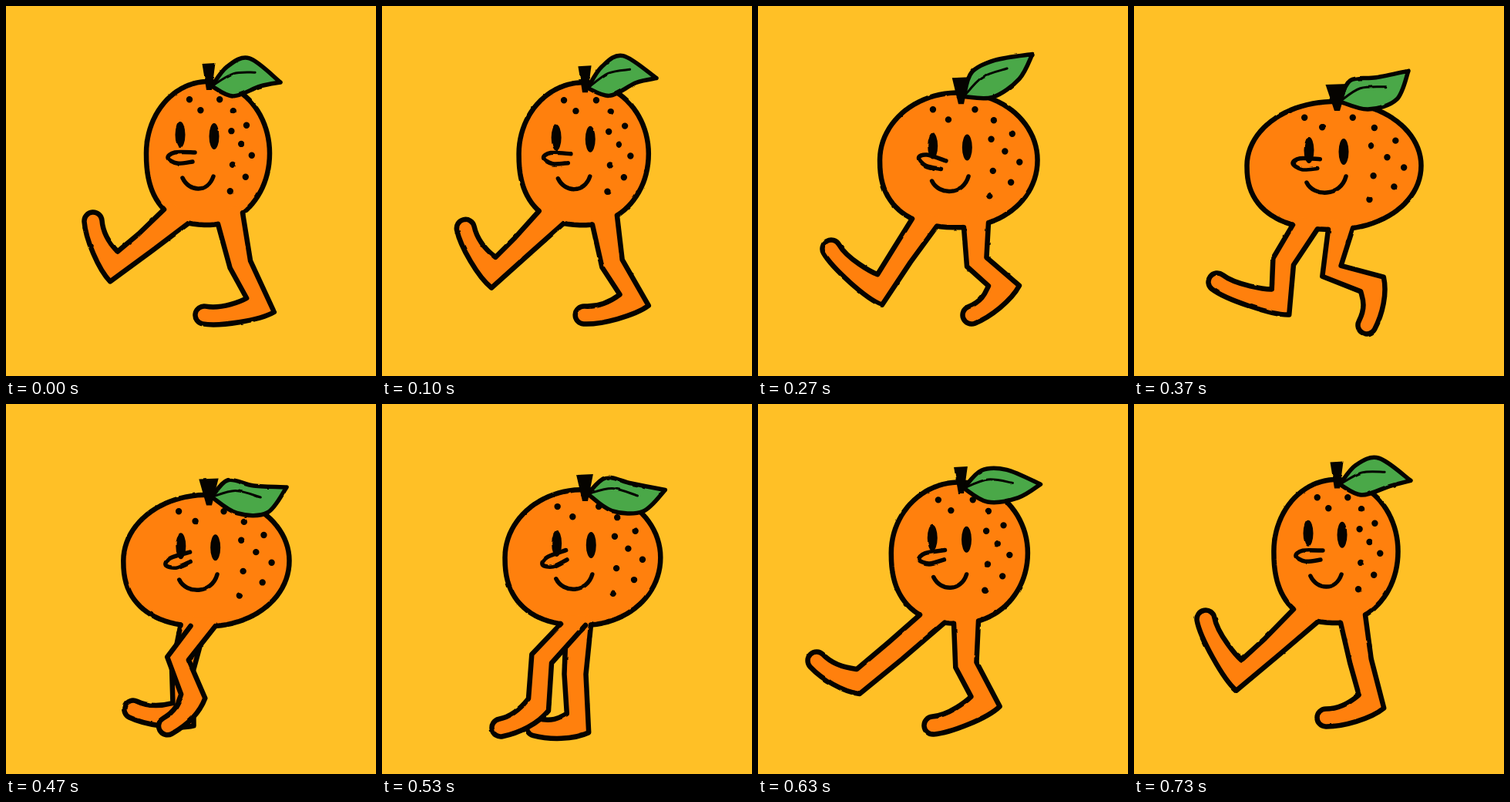
An HTML page that plays this animation: 480x480 px, repeating every 0.76 s.

```html
<!DOCTYPE html>
<html lang="en">
<head>
<meta charset="utf-8">
<title>Walking orange</title>
<style>
  html, body { margin: 0; width: 100%; height: 100%; overflow: hidden; background: #ffc026; }
  svg { display: block; width: 100vw; height: 100vh; }
  path { fill: none; stroke-linecap: round; stroke-linejoin: round; }
  .line { stroke: #050300; stroke-width: 6.5; }
  .skin { fill: #ff800d; }
  .thin { stroke-width: 5.5; }
  .ink { fill: #050300; }
  .leaf { fill: #4aa848; }
  .vein { stroke-width: 3; }
</style>
</head>
<body>
<svg viewBox="0 0 480 480">
  <filter id="rough" filterUnits="userSpaceOnUse" x="0" y="0" width="480" height="480" color-interpolation-filters="sRGB">
    <feTurbulence type="fractalNoise" baseFrequency=".06" numOctaves="2" seed="4"/>
    <feDisplacementMap in="SourceGraphic" scale="2" xChannelSelector="R" yChannelSelector="G"/>
  </filter>
  <g id="fruit" filter="url(#rough)"></g>
</svg>
<script>
const LOOP = 760; // one step; a leg repeats after two
const STEPS = [0, 70, 130, 170, 230, 270, 330, 370, 430, 470, 500, 530, 600, 630, 700, 730];

// Key poses of a leg: time, hip x, knee bend, ankle x y, toe x y
const STRIDE = [
  [0, 221, 0, 140, 338, 113, 279],
  [270, 216, 1, 158, 368, 95, 315],
  [370, 222, 13, 190, 384, 108, 358],
  [530, 255, 4, 254, 414, 199, 419],
  [630, 270, 13, 295, 386, 227, 417],
  [730, 284, 2, 308, 386, 249, 407],
  [760, 291, 7, 330, 388, 257, 401],
  [1030, 283, 19, 319, 363, 277, 401],
  [1130, 268, 37, 309, 361, 302, 414],
  [1290, 248, 20, 203, 390, 154, 420],
  [1390, 226, 0, 130, 360, 76, 333],
  [1490, 223, 0, 136, 352, 93, 279]
];
STRIDE.push([2 * LOOP, ...STRIDE[0].slice(1)]);

// Freckles, measured from the middle in body radii
const FRECKLES = [
  [-.3, -.75], [.19, -.75], [-.12, -.6], [.41, -.59], [.625, -.39], [.38, -.31],
  [.54, -.13], [.71, .03], [.4, .16], [.61, .33], [.36, .53]
];

const fruit = document.getElementById('fruit');
function path(cls) {
  const p = document.createElementNS('http://www.w3.org/2000/svg', 'path');
  p.setAttribute('class', cls);
  fruit.appendChild(p);
  return d => p.setAttribute('d', d);
}

const ui = {
  body: path('line skin'),
  legs: [0, 1].map(() => ({ fill: path('skin'), line: path('line') })),
  freckles: path('ink'), eyes: path('ink'),
  nose: path('line thin'), mouth: path('line thin'),
  leaf: path('line thin leaf'), vein: path('line vein'), stem: path('ink')
};

const { PI, sin, cos, abs, sign, sqrt, min, max } = Math;
const mix = (a, b, t) => a.map((v, i) => v + (b[i] - v) * t);
const move = (p, d, k) => [p[0] + d[0] * k, p[1] + d[1] * k];
const turn = ([x, y], a) => [x * cos(a) - y * sin(a), x * sin(a) + y * cos(a)];
const side = d => turn(d, PI / 2);
function unit(a, b) {
  const x = b[0] - a[0], y = b[1] - a[1], r = Math.hypot(x, y) || 1;
  return [x / r, y / r];
}
const between = (a, b) => unit([0, 0], move(a, b, 1));
const oval = (x, y, rx, ry) =>
  `M${x - rx} ${y}a${rx} ${ry} 0 1 1 ${2 * rx} 0a${rx} ${ry} 0 1 1 ${-2 * rx} 0Z`;

// Smooth curve through the points, continuing from the first one
function curve(pts) {
  const q = [pts[0], ...pts, pts[pts.length - 1]];
  return pts.slice(1).map((p, i) => {
    const c1 = move(q[i + 1], mix(q[i], q[i + 2], 1).map((v, k) => v - q[i][k]), 1 / 6);
    const c2 = move(p, p.map((v, k) => q[i + 3][k] - q[i + 1][k]), -1 / 6);
    return `C${c1} ${c2} ${p}`;
  }).join('');
}

// Squashes quickly, recovers softly
function squash(t) {
  if (t < 370) return (t / 370) ** 1.25;
  const u = (LOOP - t) / (LOOP - 370);
  return u * u * (3 - 2 * u);
}

// Rounded a little more at the lower left
const power = (x, y) => y < 0 ? 2 : x < 0 ? 2.4 : 2.04;

function makeBody(s) {
  const drop = s ** 1.5;
  return { cx: 262 - 2.5 * s, cy: 191 + 16 * drop, rx: 80 + 33 * s, ry: 93 - 10 * drop };
}

function drawBody({ cx, cy, rx, ry }) {
  const pts = Array.from({ length: 90 }, (_, i) => {
    const x = cos(i * PI / 45), y = sin(i * PI / 45), e = 2 / power(x, y);
    return [cx + rx * sign(x) * abs(x) ** e, cy + ry * sign(y) * abs(y) ** e];
  });
  ui.body(`M${pts.join('L')}Z`);
}

function onRim({ cx, cy, rx, ry }, x) {
  const u = (x - cx) / rx, n = power(u, 1);
  return [x, cy + ry * (1 - abs(u) ** n) ** (1 / n)];
}

function pose(t) {
  const i = STRIDE.findIndex((row, n) => n && t < row[0]);
  const a = STRIDE[i - 1], b = STRIDE[i];
  return mix(a, b, (t - a[0]) / (b[0] - a[0]));
}

function drawLeg(leg, t, body) {
  const [, hipX, bend, ax, ay, tx, ty] = pose(t);
  const hip = onRim(body, hipX), ankle = [ax, ay], toe = [tx, ty];
  const knee = move(mix(hip, ankle, .5), side(unit(hip, ankle)), bend);
  const hipF = onRim(body, hipX - 16), hipB = onRim(body, hipX + 16);

  const out = side(between(unit(hip, knee), unit(knee, ankle)));
  const kneeF = move(knee, out, 14), kneeB = move(knee, out, -14);

  const shin = unit(ankle, knee), foot = unit(ankle, toe);
  const bisect = between(shin, foot);
  const half = sqrt((1 - shin[0] * foot[0] - shin[1] * foot[1]) / 2);
  const wide = min(13.5 / half, 20);
  const ankleF = move(ankle, bisect, wide), heel = move(ankle, bisect, -wide);

  // The foot curls towards its tip
  const r = 11.5, pull = 22;
  const tip = turn(foot, .35), back = turn(foot, -.35);
  const top = move(toe, side(tip), r), low = move(toe, side(tip), -r);
  const outline = `L${kneeF}L${ankleF}` +
    `C${move(ankleF, back, pull / 3)} ${move(top, tip, -pull)} ${top}` +
    `A${r} ${r} 0 0 0 ${low}` +
    `C${move(low, tip, -pull)} ${move(heel, back, pull)} ${heel}` +
    `L${kneeB}L${hipB}`;

  const inside = p => move(p, unit(p, [body.cx, body.cy]), 12);
  leg.fill(`M${inside(hipF)}L${hipF}${outline}L${inside(hipB)}Z`);
  leg.line(`M${hipF}${outline}`);
}

function drawFace(s, wave, { cx, cy, rx, ry }) {
  ui.freckles(FRECKLES.map(([u, v]) =>
    oval(cx + u * (1 + .13 * s) * rx, cy + v * ry, 4.2, 4.2)).join(''));

  const eyeY = 168 + 20 * s ** .8;
  ui.eyes(oval(226 + s, eyeY - 1, 6.5, 17) + oval(270 + 2 * s, eyeY + 1, 6.5, 17));

  const tilt = wave * sin(PI * s / 2) * .45;
  const nose = [[17, -8], [-9, -8], [-18, -1], [-6, 6], [14, 4]]
    .map(p => move([228 - 4 * s, 198 + 8 * s], turn(p, tilt), 1));
  ui.nose(`M${nose[0]}${curve(nose)}`);

  const x1 = 229 - 5 * s, x2 = 269 + 6 * s, y1 = 223 + 6 * s, y2 = 221;
  const dip = (8 * (237 + 5 * s) - y1 - y2) / 6;
  ui.mouth(`M${x1} ${y1}C${x1 + 9} ${dip} ${x2 - 7} ${dip} ${x2} ${y2}`);
}

function drawTop(t, s, wave) {
  const w = 8.5 + 6 * s * s, y = 75 + 27 * s;
  ui.stem(`M${263 - w} ${y}L${263 + w} ${y - 1}L267 ${y + 34}L260 ${y + 34}Z`);

  // The leaf lifts while the body falls, and its outer half trails behind
  const lift = 5 + 50 * sin(PI * min(t / 540, 1)) ** 2;
  const bow = 4 + 14 * cos(2 * PI * (t - 60) / LOOP);
  const base = [267, 104 + 20 * s];
  const tip = [356 + 12 * max(0, -wave), base[1] - lift];
  const up = side(unit(tip, base));
  const at = (f, k) => move(mix(base, tip, f), up, k);
  const upper = [base, at(.24, 21 + .2 * bow), at(.57, 17 + bow), tip];
  const lower = [tip, at(.7, bow - 20), at(.3, .4 * bow - 21), base];
  ui.leaf(`M${base}${curve(upper)}${curve(lower)}Z`);
  ui.vein(`M${base}${curve([base, at(.32, 8 + .4 * bow), at(.64, .9 * bow)])}`);
}

function render(time) {
  const t = STEPS.filter(step => step <= time).pop();
  const s = squash(t), body = makeBody(s), wave = sin(2 * PI * t / LOOP);
  drawBody(body);
  ui.legs.forEach((leg, i) => drawLeg(leg, t + i * LOOP, body));
  drawFace(s, wave, body);
  drawTop(t, s, wave);
}

function tick() {
  render(performance.now() % LOOP);
  requestAnimationFrame(tick);
}
tick();
</script>
</body>
</html>
```
